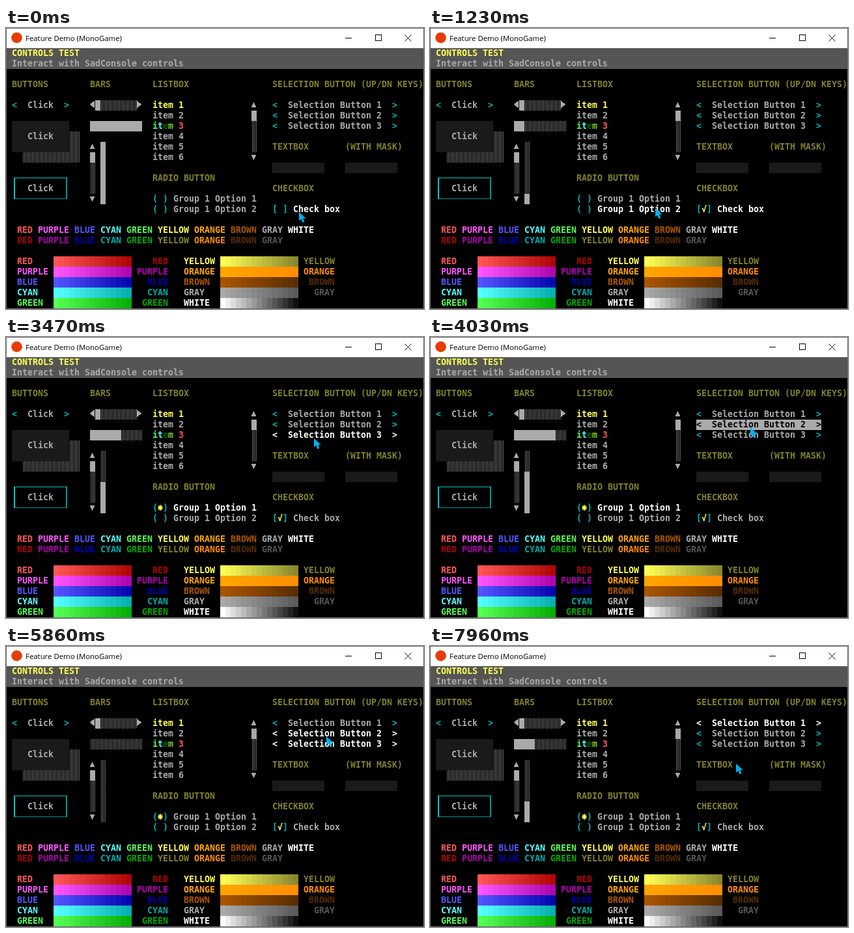
These frames come from a looping animation (642x432 px, 7990 ms). An HTML page:

```html
<!DOCTYPE html>
<html lang="en">
<head>
<meta charset="utf-8">
<title>Feature Demo</title>
<style>
  html, body { margin: 0; width: 642px; height: 432px; overflow: hidden; background: #000; }
  svg { display: block; }
  rect, line, .arrow { shape-rendering: crispEdges; }
  .cell { font: bold 13.29px "DejaVu Sans Mono", monospace; white-space: pre; }
  .title { font: 11.4px "Open Sans", "Noto Sans", sans-serif; }
</style>
</head>
<body>
<svg id="stage" width="642" height="432" viewBox="0 0 642 432">
  <defs>
    <pattern id="shade" patternUnits="userSpaceOnUse" x="1" y="31" width="4" height="2">
      <rect x="3" y="0" width="1" height="1" fill="#aaa"/>
      <rect x="1" y="1" width="1" height="1" fill="#aaa"/>
    </pattern>
  </defs>
  <rect width="642" height="432" fill="#000"/>
  <rect width="642" height="31" fill="#fff"/>
  <circle cx="16.5" cy="15" r="8.3" fill="#e73c00"/>
  <text class="title" x="30" y="20">Feature Demo (MonoGame)</text>
  <g fill="none" stroke="#000">
    <path d="M521 15.5h10M567.5 10.5h9v9h-9z" shape-rendering="crispEdges"/>
    <path d="M612.5 10.5l10 10M622.5 10.5l-10 10"/>
  </g>
  <g id="screen"></g>
  <rect x=".5" y=".5" width="641" height="431" fill="none" stroke="#6b6b6b"/>
  <path id="cursor" fill="#00b0f0" d="M0 0V13.5L3.2 10.8L5.6 16.2L8.4 15L6.2 9.8H10.8Z"/>
</svg>
<script>
const LOOP = 7990;
const GRAY = '#aaaaaa', CYAN = '#00b4b4', YELLOW = '#ffff55', OLIVE = '#80802b', PANEL = '#1a1a1a';
const screen = document.getElementById('screen');
const cursor = document.getElementById('cursor');

const px = col => 1 + col * 8;
const py = row => 31 + row * 16;

function add(tag, attrs) {
  const el = document.createElementNS('http://www.w3.org/2000/svg', tag);
  for (const k in attrs) el.setAttribute(k, attrs[k]);
  return screen.appendChild(el);
}

function text(col, row, str, fill = GRAY) {
  const el = add('text', { class: 'cell', x: px(col), y: py(row) + 12, fill });
  el.textContent = str;
  return el;
}

function box(col, row, cols, rows, fill) {
  return add('rect', { x: px(col), y: py(row), width: cols * 8, height: rows * 16, fill });
}

// A small shape drawn inside one character cell
function glyph(col, row, d, attrs) {
  return add('path', { d, transform: `translate(${px(col)} ${py(row)})`, ...attrs });
}

function arrow(col, row, dir) {
  const shapes = {
    left: 'M0 6.5L7 .5V12.5Z', right: 'M7 6.5L0 .5V12.5Z',
    up: 'M3.5 3L7.5 11H-.5Z', down: 'M3.5 12L7.5 4H-.5Z'
  };
  glyph(col, row, shapes[dir], { class: 'arrow', fill: GRAY });
}

function vScroll(col, row) {
  arrow(col, row, 'up');
  box(col, row + 1, 1, 1, GRAY);
  box(col, row + 2, 1, 3, 'url(#shade)');
  arrow(col, row + 5, 'down');
}

// Header and section labels
box(0, 0, 80, 2, '#555');
text(1, 0, 'CONTROLS TEST', YELLOW);
text(1, 1, 'Interact with SadConsole controls');
[[1, 3, 'BUTTONS'], [16, 3, 'BARS'], [28, 3, 'LISTBOX'], [51, 3, 'SELECTION BUTTON (UP/DN KEYS)'],
 [51, 9, 'TEXTBOX'], [65, 9, '(WITH MASK)'], [28, 12, 'RADIO BUTTON'], [51, 13, 'CHECKBOX']]
  .forEach(l => text(...l, OLIVE));

// Buttons
text(1, 5, '<', CYAN);
text(11, 5, '>', CYAN);
box(3, 8, 11, 3, 'url(#shade)');
box(1, 7, 11, 3, PANEL);
[[12, 230, 82, 1, '#00c8c8'], [12, 230, 2, 33, '#00c8c8'], [92, 231, 2, 32, '#009696'], [14, 262, 80, 1, '#009696']]
  .forEach(([x, y, width, height, fill]) => add('rect', { x, y, width, height, fill }));
[5, 8, 13].forEach(row => text(4, row, 'Click'));

// Bars
arrow(16, 5, 'left');
box(17, 5, 1, 1, GRAY);
box(18, 5, 7, 1, 'url(#shade)');
arrow(25, 5, 'right');
vScroll(16, 9);
box(16, 7, 10, 1, 'url(#shade)');
box(18, 9, 1, 6, 'url(#shade)');
const hBar = box(16, 7, 10, 1, GRAY);
const vBar = box(18, 9, 1, 6, GRAY);

// List
[1, 2, 4, 5, 6].forEach(n => text(28, 4 + n, 'item ' + n, n === 1 ? YELLOW : GRAY));
[[28, 'i', '#55ff55'], [29, 't', '#55ffff'], [30, 'e', '#006400'], [31, 'm', '#80d020'], [33, '3', '#ff5555']]
  .forEach(([col, ch, fill]) => text(col, 7, ch, fill));
vScroll(47, 5);

// Text boxes
box(51, 11, 10, 1, PANEL);
box(65, 11, 10, 1, PANEL);

// Colour samples
const colors = [
  ['RED', '#ff5555', '#aa0000'], ['PURPLE', '#ff55ff', '#aa00aa'], ['BLUE', '#5555ff', '#0000aa'],
  ['CYAN', '#55ffff', '#00aaaa'], ['GREEN', '#55ff55', '#00aa00'], ['YELLOW', YELLOW, OLIVE],
  ['ORANGE', '#ffa500', '#ff8c00'], ['BROWN', '#aa5500', '#552b00'], ['GRAY', GRAY, '#555555'],
  ['WHITE', '#ffffff', '#000000']
];
const rgb = hex => [1, 3, 5].map(i => parseInt(hex.slice(i, i + 2), 16));
function mix(a, b, k) {
  const to = rgb(b);
  return `rgb(${rgb(a).map((v, i) => Math.round(v + (to[i] - v) * k))})`;
}
let nextCol = 2;
colors.forEach(([name, bright, dark], i) => {
  const left = i < 5 ? 2 : 34, row = 20 + i % 5;
  const hasDark = name !== 'WHITE';
  text(nextCol, 17, name, bright);
  if (hasDark) text(nextCol, 18, name, dark);
  nextCol += name.length + 1;

  text(left, row, name, bright);
  for (let n = 0; n < 15; n++) box(left + 7 + n, row, 1, 1, mix(bright, dark, n / 15));
  if (hasDark) text(left + 29 - name.length, row, name, dark);
});

// Interactive controls: marks are the brackets or arrows around the label
function control(col, row, cols, label, labelCol, marks, lit) {
  return {
    col, row, cols, lit,
    back: box(col, row, cols, 1, '#000'),
    marks: marks.map(([c, s]) => text(c, row, s, CYAN)),
    label: text(labelCol, row, label)
  };
}
const controls = {
  check: control(51, 15, 13, 'Check box', 55, [[51, '['], [53, ']']], CYAN)
};
[1, 2].forEach(n => controls['opt' + n] =
  control(28, 13 + n, 20, 'Group 1 Option ' + n, 32, [[28, '('], [30, ')']], CYAN));
[1, 2, 3].forEach(n => controls['sel' + n] =
  control(51, 4 + n, 24, 'Selection Button ' + n, 54, [[51, '<'], [74, '>']], '#fff'));

const tick = text(52, 15, '√', YELLOW);
const star = glyph(29, 14, 'M4 3V12M0 7.5H8M1 4.5L7 10.5M7 4.5L1 10.5',
  { stroke: YELLOW, 'stroke-width': 1.6 });

// Timeline
const steps = [60, 560, 1060, 1560, 2060, 2570, 3060, 3550, 4030, 4540, 5040, 5530, 5990, 6490, 6990, 7480];
const focusAt = [
  [510, 'check'], [1690, 'opt2'], [2830, 'opt1'], [4190, 'sel2'], [4920, 'sel3'], [5070, 'sel1'],
  [5240, 'sel2'], [5390, 'sel3'], [5550, 'sel1'], [5690, 'sel2'], [5860, 'sel3'], [5990, 'sel1']
];
const presses = [[300, 510, 'check'], [1480, 1690, 'opt2'], [2630, 2830, 'opt1'], [3960, 4190, 'sel2']];
const path = [
  [0, 450, 283], [30, 450, 283], [100, 454, 285], [870, 454, 285], [1230, 346, 277], [2000, 346, 277],
  [2300, 346, 261], [3180, 346, 261], [3470, 473, 156], [3710, 492, 139], [7790, 492, 139],
  [7960, 470, 181], [LOOP, 470, 181]
];

function pointer(t) {
  const i = path.findIndex(p => p[0] > t);
  const [t0, x0, y0] = path[i - 1], [t1, x1, y1] = path[i];
  const k = (t - t0) / (t1 - t0);
  return [Math.round(x0 + (x1 - x0) * k), Math.round(y0 + (y1 - y0) * k)];
}

const show = (el, on) => el.setAttribute('visibility', on ? 'visible' : 'hidden');

function draw(t) {
  const count = steps.filter(s => s <= t).length;
  const tenths = (count + 10) % 11;
  const rows = Math.floor(tenths * 0.6 + 1e-6);
  hBar.setAttribute('width', tenths * 8);
  vBar.setAttribute('y', py(15 - rows));
  vBar.setAttribute('height', rows * 16);

  const [x, y] = pointer(t);
  cursor.setAttribute('transform', `translate(${x} ${y})`);

  const focus = (focusAt.filter(f => f[0] <= t).pop() || [])[1];
  const press = (presses.find(p => p[0] <= t && t < p[1]) || [])[2];
  for (const name in controls) {
    const c = controls[name];
    const over = x >= px(c.col) && x < px(c.col + c.cols) && y >= py(c.row) && y < py(c.row + 1);
    const active = over || name === focus, down = name === press;
    c.back.setAttribute('fill', down ? GRAY : '#000');
    c.label.setAttribute('fill', down ? '#000' : active ? '#fff' : GRAY);
    c.marks.forEach(m => m.setAttribute('fill', down ? '#000' : active ? c.lit : CYAN));
  }
  show(tick, t >= 510);
  show(star, t >= 1690);
  star.setAttribute('transform', `translate(${px(29)} ${py(t < 2830 ? 15 : 14)})`);
}

const start = performance.now();
function frame() {
  draw((performance.now() - start) % LOOP);
  requestAnimationFrame(frame);
}
frame();
</script>
</body>
</html>
```
